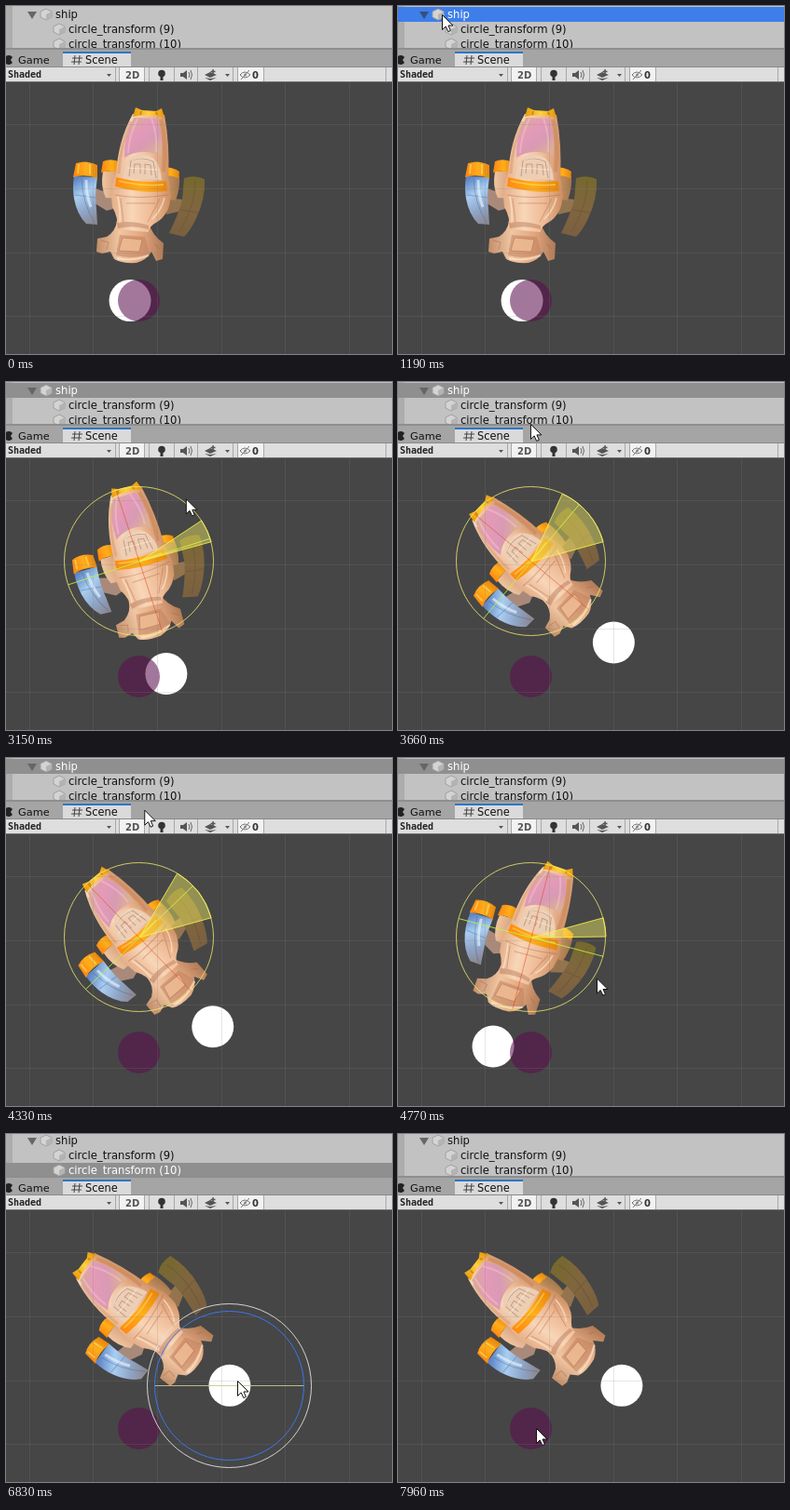
Animation of 414 by 374 pixels, one loop 7.99 s. Source, as an HTML page with a canvas:

```html
<!DOCTYPE html>
<html>
<head>
<meta charset="utf-8">
<style>
html, body { margin: 0; width: 100%; height: 100%; overflow: hidden; background: #464646; }
canvas { display: block; }
</style>
</head>
<body>
<canvas id="stage" width="414" height="374"></canvas>
<script>
const ctx = document.getElementById('stage').getContext('2d');
const LOOP = 7990, TAU = Math.PI * 2, DEG = Math.PI / 180;
const SANS = '"DejaVu Sans", sans-serif', MONO = '"DejaVu Sans Mono", monospace';
const PIVOT = { x: 143, y: 193 };
const RING = 80, ORBIT = 124, GRAB = 15.4;
const HOVER = 'rgba(201,200,144,.89)', ACTIVE = 'rgba(246,242,80,.85)';

// time, x, y of the pointer
const pointer = [
  [400, 386, 226], [780, 44, 3], [960, 44, 3], [1190, 47, 9], [1730, 47, 9],
  [2160, 221, 194], [2270, 221, 194], [2520, 219, 174], [2560, 219, 172], [2780, 219, 172],
  [3560, 148, 52], [3660, 142, 45], [3860, 128, -6], [4140, 156, 84], [4390, 147, 51],
  [4430, 149, 54], [4770, 213, 236], [4980, 176, 338], [5210, 205, 286], [5250, 206, 278],
  [5480, 152, 85], [5690, 133, 45], [5870, 133, 45], [6530, 248, 265], [6830, 248, 265],
  [7360, 148, 316], [7720, 148, 316], [7840, 178, 305], [7960, 148, 316]
];
// time, counter-clockwise degrees of the ship
const turn = [
  [2780, 0], [3560, 47], [3660, 50], [3860, 64], [4140, 32], [4390, 46], [4430, 43],
  [4770, -14.5], [4980, -62], [5210, -34], [5250, -31], [5480, 30], [5690, 56]
];

// Monotone cubic through the keys
function sample(keys, t, col) {
  const last = keys.length - 1;
  if (t <= keys[0][0]) return keys[0][col];
  if (t >= keys[last][0]) return keys[last][col];
  let i = 0;
  while (t >= keys[i + 1][0]) i++;
  const slope = k => k < 0 || k >= last ? 0
    : (keys[k + 1][col] - keys[k][col]) / (keys[k + 1][0] - keys[k][0]);
  const tangent = k => {
    const a = slope(k - 1), b = slope(k);
    return a * b <= 0 ? 0 : 2 * a * b / (a + b);
  };
  const h = keys[i + 1][0] - keys[i][0], u = (t - keys[i][0]) / h;
  const s = u * u * (3 - 2 * u);
  return keys[i][col] * (1 - s) + keys[i + 1][col] * s
    + h * u * (1 - u) * (tangent(i) * (1 - u) - tangent(i + 1) * u);
}

function box(x, y, w, h, color) {
  ctx.fillStyle = color;
  ctx.fillRect(x, y, w, h);
}
function label(str, x, y, size, color = '#111', weight = '', family = SANS) {
  ctx.font = `${weight} ${size}px ${family}`;
  ctx.fillStyle = color;
  ctx.fillText(str, x, y);
}
function disc(x, y, r, color) {
  ctx.fillStyle = color;
  ctx.beginPath();
  ctx.arc(x, y, r, 0, TAU);
  ctx.fill();
}
function ring(x, y, r, color) {
  ctx.strokeStyle = color;
  ctx.beginPath();
  ctx.arc(x, y, r, 0, TAU);
  ctx.stroke();
}
function line(x1, y1, x2, y2, color) {
  ctx.strokeStyle = color;
  ctx.beginPath();
  ctx.moveTo(x1, y1);
  ctx.lineTo(x2, y2);
  ctx.stroke();
}
function shape(d, fill, stroke, width = 1) {
  const p = new Path2D(d);
  if (fill) { ctx.fillStyle = fill; ctx.fill(p); }
  if (stroke) { ctx.strokeStyle = stroke; ctx.lineWidth = width; ctx.stroke(p); ctx.lineWidth = 1; }
}
function blend(x1, y1, x2, y2, ...colors) {
  const g = ctx.createLinearGradient(x1, y1, x2, y2);
  colors.forEach((c, i) => g.addColorStop(i / (colors.length - 1), c));
  return g;
}

function drawShip() {
  const seam = 'rgba(165,90,60,.38)', glow = 'rgba(255,240,220,.6)';
  const gold = (x1, x2) => blend(x1, 0, x2, 0, '#ff8a10', '#ffae1c', '#e8860c');

  // struts
  shape('M95 196L118 203L118 217L108 220L95 212Z', '#a98a7a');
  shape('M172 206L190 208L189 220L172 224Z', '#94744f');

  // far wing
  shape('M191 185Q202 181 213 186Q214 207 204 228Q198 241 191 248L175 244Q185 224 189 208Z',
    blend(196, 184, 188, 246, '#76682f', '#80663f', '#7a6040'));
  shape('M203 188Q203 215 186 243M187 219L206 222', null, 'rgba(95,75,45,.4)');

  // near wing
  shape('M73 183L98 184Q95 204 97 218L98 235L86 234Q76 224 73 207Q71 194 73 183Z',
    blend(72, 188, 98, 232, '#5f87c8', '#a9cdf0', '#8fa6c8', '#8c8790'));
  shape('M81 185Q82 212 95 233M74 203L96 206', null, 'rgba(70,95,140,.4)');
  shape('M86 187Q86 203 91 216', null, 'rgba(235,248,255,.6)', 3);
  shape('M75 169Q86 165 98 171L98 185Q84 180 72 184Z', gold(74, 98));
  shape('M78 170L77 180M90 170L90 181', null, 'rgba(255,225,100,.6)', 2);

  // inner engines
  shape('M104 178L122 178L121 207L107 206Q101 194 104 178Z', blend(102, 0, 122, 0, '#f0c8a2', '#d49c78'));
  shape('M104 167Q113 163 123 168L122 180Q112 176 102 179Z', gold(103, 123));
  shape('M169 181L186 182Q187 196 182 209L168 207Z', blend(168, 0, 187, 0, '#d39b68', '#a0754a'));
  shape('M167 174Q178 172 186 178L185 185Q176 181 167 183Z', gold(167, 186));

  // tail
  shape('M119 230L153 232Q156 246 169 255L168 272L161 274L156 264Q151 273 140 276Q124 277 116 272'
    + 'L112 264L103 266L97 264L98 250L108 248Q118 242 119 230Z',
    blend(98, 0, 169, 0, '#c4906c', '#f0c6a2', '#e2a880', '#b07a56'));
  shape('M122 246L149 248L154 266Q136 273 118 268Z', 'rgba(196,130,95,.55)');
  shape('M125 249L146 251L143 264L121 263Z', 'rgba(240,190,150,.8)', seam);
  shape('M119 271Q135 275 153 268', null, glow, 2);
  shape('M102 252L110 254L108 262M159 256L165 261', null, seam);

  // hull
  shape('M136 116L170 117Q176 150 174 184Q179 204 174 218Q169 229 159 234Q153 238 153 243'
    + 'L119 240Q121 228 114 216Q111 196 118 181Q120 145 136 116Z',
    blend(114, 0, 177, 0, '#e6b08a', '#f8d6b8', '#efbb96', '#cd8e62'));
  shape('M137 120L162 121Q170 142 166 162Q146 151 127 163Q126 140 137 120Z',
    blend(133, 124, 160, 158, '#d8ab9c', '#e49ab8', '#d89ab4', '#dcae98'));
  shape('M141 121Q132 139 131 158M156 121Q163 140 161 157', null, 'rgba(255,215,210,.35)', 2);
  shape('M166 122Q172 145 169 178', null, 'rgba(200,130,85,.5)', 4);
  shape('M134 124Q123 148 121 180', null, 'rgba(200,135,95,.35)', 3);
  shape('M126 185Q126 160 146 159Q165 160 167 187Z', '#ecceb4');
  shape('M132 183L134 166Q146 161 158 167L161 185M137 180L138 170L144 170L144 180M149 181L149 170L155 171L156 182',
    null, 'rgba(150,95,75,.45)');
  shape('M130 174L163 176M134 166Q146 160 158 166', null, glow);
  shape('M118 184Q145 191 172 188L173 199Q146 202 117 194Z', gold(117, 173));
  shape('M121 188Q146 194 169 192', null, 'rgba(255,214,90,.7)', 1.5);
  shape('M117 203Q140 208 174 203M123 207L126 232M165 207L152 232M129 212L160 212', null, seam);
  shape('M120 205Q123 220 122 234M170 206Q167 219 157 229', null, glow, 1.5);
  shape('M119 233Q136 230 153 236L153 240Q136 235 120 239Z', 'rgba(170,105,75,.4)');

  // nose
  shape('M139 109L146 112L161 113L167 110L170 120Q152 115 136 119Z', blend(136, 0, 170, 0, '#e99a08', '#ffd23a', '#ea9408'));
  shape('M145 113L144 117M161 114L162 117', null, 'rgba(184,106,16,.6)', 2);
}

function drawScene(rot) {
  box(0, 82, 414, 292, '#464646');
  ctx.save();
  ctx.translate(PIVOT.x, PIVOT.y);
  ctx.rotate(-rot * DEG);
  ctx.translate(-PIVOT.x, -PIVOT.y);
  drawShip();
  ctx.restore();

  const a = (rot - 4.6) * DEG;
  disc(PIVOT.x + ORBIT * Math.sin(a), PIVOT.y + ORBIT * Math.cos(a), 22.5, '#fff');
  disc(142.5, 316.5, 22.5, 'rgba(91,14,77,.56)');

  const grid = 'rgba(128,128,128,.2)';
  for (let i = 0; i < 6; i++) box(Math.round(24.8 + 68.6 * i), 82, 1, 292, grid);
  for (let i = 0; i < 4; i++) box(0, Math.round(127 + 68.75 * i), 414, 1, grid);
}

function idleGizmo(x, y, mx, my, withRed) {
  const dx = mx - x, dy = my - y, far = Math.hypot(dx, dy);
  const onLine = Math.abs(dy) < 6 && Math.abs(dx) < RING + 3;
  const onRing = !onLine && Math.abs(far - RING) < 5;
  if (withRed) line(x, y - RING, x, y + RING, 'rgba(219,62,29,.5)');
  line(x - RING, y, x + RING, y, onLine ? HOVER : 'rgba(154,243,72,.8)');
  ring(x, y, RING, onRing ? HOVER : 'rgba(58,122,248,.93)');
  ring(x, y, RING + 8, 'rgba(225,225,225,.9)');
}

function dragGizmo(rot) {
  const { x, y } = PIVOT, a = rot * DEG;
  const from = -GRAB * DEG, to = -(GRAB + rot) * DEG;
  const c = RING * Math.cos(a), s = RING * Math.sin(a);
  line(x - s, y - c, x + s, y + c, 'rgba(219,62,29,.5)');
  line(x - c, y + s, x + c, y - s, 'rgba(190,246,62,.85)');
  ctx.beginPath();
  ctx.moveTo(x, y);
  ctx.arc(x, y, RING, from, to, rot > 0);
  ctx.closePath();
  ctx.fillStyle = 'rgba(246,240,100,.44)';
  ctx.fill();
  ctx.strokeStyle = ACTIVE;
  ctx.stroke();
  ring(x - .5, y - .5, RING, 'rgba(240,236,110,.8)');
}

function cube(x, y) {
  shape(`M${x} ${y - 6}L${x + 6} ${y - 3}V${y + 3}L${x} ${y + 6}L${x - 6} ${y + 3}V${y - 3}Z`, '#d4d4d4', '#a0a0a0');
  shape(`M${x} ${y}L${x + 6} ${y - 3}V${y + 3}L${x} ${y + 6}Z`, '#b4b4b4');
}

function drawTree(t) {
  const scroll = t >= 6530 ? 2 : 0;
  const selected = t < 1100 ? -1 : t < 6530 ? 0 : t < 7540 ? 2 : -1;
  const fill = t < 2780 ? '#3d7eea' : '#8f8f8f';
  ctx.save();
  ctx.beginPath();
  ctx.rect(0, 0, 414, 46);
  ctx.clip();
  box(0, 0, 414, 46, '#c2c2c2');
  box(0, 0, 7, 46, '#adadad');
  ['ship', 'circle_transform (9)', 'circle_transform (10)'].forEach((name, i) => {
    const top = 1 + 16 * i - scroll, on = i === selected;
    if (on) box(0, top, 414, 16, fill);
    cube(i ? 57 : 43, top + 8);
    label(name, i ? 67 : 53, top + 12, 11.6, on ? '#fff' : '#111');
  });
  const y = 6 - scroll;
  shape(`M23 ${y}H33L28 ${y + 8}Z`, selected === 0 && t < 2780 ? '#35507c' : '#666');
  ctx.restore();
}

function drawBars(t) {
  box(0, 45, 414, 2, '#8e8e8e');
  box(0, 47, 414, 19, '#a5a5a5');
  box(61, 49, 73, 17, '#dadada');
  if (t < 1460 || t >= 2780) box(61, 49, 73, 2, '#2d76c4');
  ctx.fillStyle = '#222';
  ctx.beginPath();
  ctx.moveTo(5, 58);
  ctx.arc(3, 58, 5, .65, -.65);
  ctx.fill();
  label('Game', 13, 62, 11.3);
  shape('M74 53L73 63M79 53L78 63M71 56H82M70 60H81', null, '#444');
  label('Scene', 85, 62, 11.4);

  box(0, 65, 414, 1, '#8a8a8a');
  box(0, 66, 414, 15, '#dedede');
  box(0, 81, 414, 1, '#707070');
  box(122, 66, 26, 15, '#f2f2f2');
  box(249, 66, 27, 15, '#f2f2f2');
  for (const x of [117, 121, 148, 153, 180, 205, 243, 248, 276, 407]) box(x, 66, 1, 15, '#a8a8a8');
  label('Shaded', 2, 77, 10, '#222', 'bold', MONO);
  label('2D', 128, 78, 10, '#555', 'bold');
  label('0', 264, 78, 10, '#333', 'bold');
  shape('M108 73H113L110.5 76ZM235 73H240L237.5 76Z', '#555');

  // bulb, speaker, layers, eye
  disc(167, 72.5, 3.8, '#333');
  box(165.5, 75, 3, 5, '#333');
  shape('M187 72H190L194 69V79L190 76H187Z', '#555');
  shape('M196 71Q198 74 196 77M198 69Q201 74 198 79', null, '#666');
  shape('M213 74L219 71L226 74L219 77ZM213 77L219 80L226 77L219 78Z', '#555');
  shape('M222 68V73M219.5 70.5H224.5', null, '#555', 1.5);
  shape('M251 74Q256 68 262 74Q256 80 251 74ZM252 79L261 69', null, '#777');
  disc(256.5, 74, 1.5, '#888');
}

function drawPointer(x, y) {
  ctx.save();
  ctx.translate(x, y);
  shape('M.5 .5V16.5L4.2 13L6.8 18.6L9.4 17.4L7 12H12Z', '#fff', '#111');
  ctx.restore();
}

function render(t) {
  const rot = sample(turn, t, 1);
  const mx = sample(pointer, t, 1), my = sample(pointer, t, 2);
  drawScene(rot);
  if (t >= 2780 && t < 5690) dragGizmo(rot);
  else if (t >= 1460 && t < 6530) idleGizmo(PIVOT.x - .5, PIVOT.y - .5, mx, my, true);
  else if (t >= 6530 && t < 7540) idleGizmo(239.5, 270.5, mx, my, false);
  drawTree(t);
  drawBars(t);
  if (t >= 400) drawPointer(mx, my);
}

const start = performance.now();
function frame() {
  render((performance.now() - start) % LOOP);
  requestAnimationFrame(frame);
}
frame();
</script>
</body>
</html>
```
